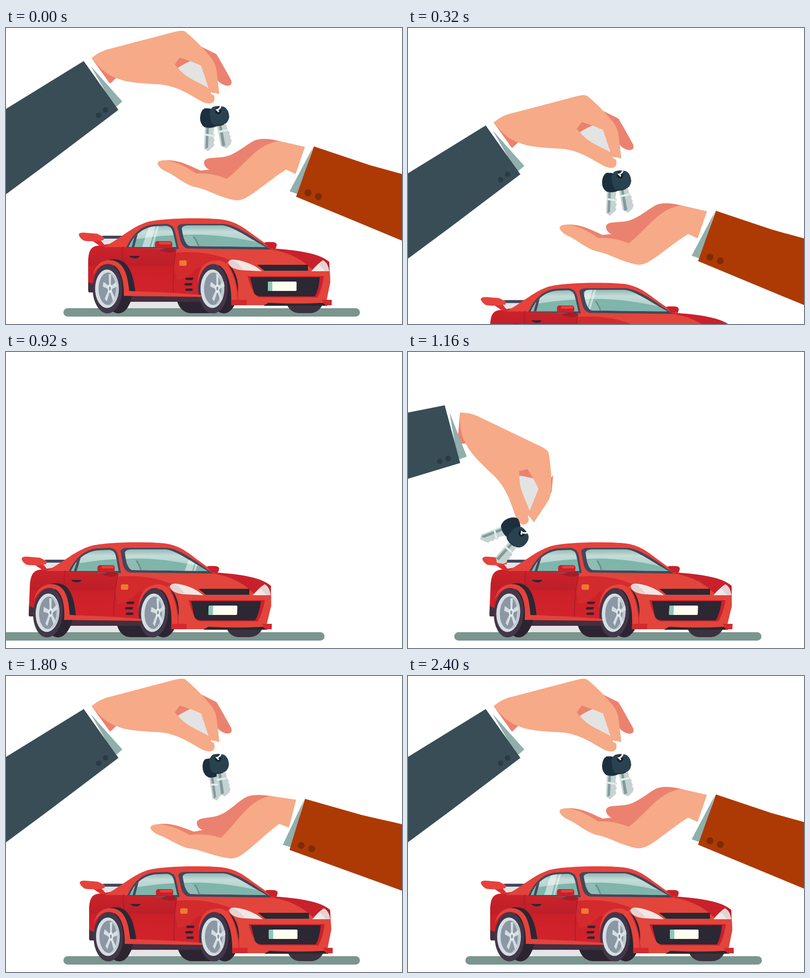
An HTML page that plays this animation: 800x600 px, repeating every 2440 ms.

```html
<!DOCTYPE html>
<html lang="en">
<head>
<meta charset="utf-8">
<title>Car keys handover</title>
<style>
html, body { margin: 0; width: 100%; height: 100%; overflow: hidden; background: #fff; }
svg { display: block; width: 100vw; height: 100vh; }
</style>
</head>
<body>
<svg viewBox="0 0 800 600">
  <defs>
    <linearGradient id="pane" x1="0" y1="0" x2="0" y2="1">
      <stop offset="0" stop-color="#8fb5b1"/><stop offset=".3" stop-color="#c3dcd8"/><stop offset="1" stop-color="#a5cbc5"/>
    </linearGradient>
    <linearGradient id="door" x1="0" y1="0" x2="0" y2="1">
      <stop offset="0" stop-color="#cf232b"/><stop offset=".38" stop-color="#bd1f29"/><stop offset=".42" stop-color="#cc2029"/><stop offset="1" stop-color="#d4242c"/>
    </linearGradient>
    <clipPath id="glass">
      <path d="M248 444C257 422 274 405 300 402L324 401Q334 402 337 413L344 444Z"/>
      <path d="M355 406Q357 400 368 400H438C460 403 495 428 524 444L372 442Q360 440 355 406Z"/>
    </clipPath>
    <g id="wheel">
      <ellipse cx="22" rx="29" ry="50" fill="#2c2531"/>
      <ellipse rx="30" ry="50" fill="#43374a"/>
      <ellipse cx="-1" rx="24" ry="39" fill="#d5dfe2"/>
      <ellipse cx="1" rx="19" ry="33" fill="#8b97a4"/>
      <path d="M4 -33A18 33 0 0 1 4 33A30 40 0 0 0 4 -33" fill="#bcc9cf"/>
    </g>
  </defs>

  <rect id="road" y="568" height="17" rx="8.500" fill="#7b958f"/>

  <g id="car">
    <path d="M250 555H352L360 568H250Z" fill="#e6e4e6"/>
    <path d="M345 552H425V578H372Q352 576 345 552Z" fill="#2c2531"/>
    <path d="M566 558H641Q632 578 614 578H592Q574 577 566 558Z" fill="#3b3240"/>
    <path d="M235 538H470V555H235Z" fill="#43303f"/>
    <path d="M166 512H182V536H168Q166 536 166 530Z" fill="#43303f"/>
    <path d="M188 426H232L212 441H196Z" fill="#e3e3e6"/>
    <path d="M194 421H238L232 427H196Z" fill="#45465a"/>
    <path d="M166 515V472C167 450 172 442 188 441L232 434L540 447C585 450 632 456 653 474L655 515L646 556L455 556V545L240 543Z" fill="url(#door)"/>
    <path d="M198 444C232 426 250 406 283 394C312 385 400 384 435 388C463 392 478 403 498 418L540 448L350 450L236 444Z" fill="#e6423c"/>
    <path d="M172 430L190 429L201 442L190 442Z" fill="#d92f31"/>
    <path d="M147 419Q148 414 160 415L184 417L198 424L197 430Q172 434 157 431Q148 425 147 419Z" fill="#e6423c"/>
    <path d="M343 449L528 448C574 451 606 470 619 487L654 491L655 515L648 551H658V562H455L456 530L390 480C372 465 354 458 343 458Z" fill="#e2453b"/>
    <path d="M344 455C385 452 420 457 452 470L440 481L385 487Q365 512 345 510L338 480Z" fill="#d32a2e"/>
    <path d="M523 448C575 448 630 456 646 470Q630 474 619 490C600 470 568 451 523 448Z" fill="#c9212b"/>
    <path d="M236 443Q231 465 243 486M343 450Q336 495 338 537" fill="none" stroke="#a51c28" stroke-width="1.500"/>

    <path d="M243 445C254 420 272 400 300 398L325 397Q338 399 341 411L349 448Z" fill="#45465a"/>
    <path d="M346 403Q349 397 360 397H440C466 399 502 426 535 449L367 447Q354 444 351 425Z" fill="#45465a"/>
    <g clip-path="url(#glass)">
      <rect x="240" y="399" width="290" height="47" fill="url(#pane)"/>
      <path d="M240 432C285 424 335 418 345 421C400 414 470 424 530 440V448H240Z" fill="#7fb5ab"/>
      <path d="M266 408L256 446" stroke="#45465a" stroke-width="5"/>
      <path d="M355 425Q372 416 381 425Q387 434 389 443H355Z" fill="#8fbdb5"/>
      <path d="M379 423Q386 432 389 443" stroke="#66918d" stroke-width="3" fill="none"/>
      <path id="shine" d="M290 398H303L289 447H274ZM306 398H310L296 447H292Z" fill="#fff" opacity=".5"/>
    </g>
    <path d="M310 450Q323 446 333 445L345 450L338 455Q320 457 310 450Z" fill="#a51c28"/>
    <rect x="301" y="432" width="35" height="14" rx="5" fill="#c9212b"/>
    <rect x="309" y="433.500" width="25" height="5" rx="2.500" fill="#e6423c"/>
    <path d="M522 435Q525 433 540 434Q547 435 547 440L545 447H532Z" fill="#c9212b"/>
    <path d="M249 462H270Q268 467 260 467Q251 466 249 462Z" fill="#2b2733"/>
    <rect x="350" y="471" width="15" height="11" rx="3" fill="#ee7a2f"/>
    <path d="M365 506H379L377 511H365Q359 508 365 506ZM363 517H377L375 522H363Q357 520 363 517ZM365 528H377V533H365Q358 531 365 528Z" fill="#2b2733"/>

    <use href="#wheel" x="205" y="528.500"/>
    <use href="#wheel" x="418" y="528.500"/>
    <g class="hub" transform="translate(210 528) scale(.5 1)"></g>
    <g class="hub" transform="translate(427 528) scale(.5 1)"></g>

    <path d="M208 470C248 461 257 500 262 538L245 534C245 502 232 480 208 470Z" fill="#2b2733"/>
    <path d="M176 502C180 468 216 463 232 480C245 494 247 518 249 533L340 537L394 541V545L238 543C239 512 231 479 207 478C190 478 181 490 176 502Z" fill="#e6423c"/>
    <path d="M387 520C388 480 407 471 428 471C454 474 466 505 470 552H486V562H455C457 518 445 479 420 478C400 478 391 500 387 520Z" fill="#e6423c"/>
    <path d="M448 480Q466 504 469 552" fill="none" stroke="#cf2a2e" stroke-width="2"/>
    <path d="M456 551H486V562H455Z" fill="#d32a2e"/>

    <path d="M449 475Q452 468 465 470C485 473 505 482 517 493L478 491Q453 489 449 475Z" fill="#f3e7e5"/>
    <path d="M452 471Q464 469 480 490Q453 489 449 475Z" fill="#e4d3d1"/>
    <path d="M617 493Q629 478 640 471Q650 475 653 493Z" fill="#f3e7e5"/>
    <path d="M632 479L640 471Q650 475 653 493H645Z" fill="#e4d3d1"/>
    <path d="M507 480H610V492H522Z" fill="#2b2733"/>
    <path d="M488 503H642Q638 532 629 546H512Q500 545 488 503Z" fill="#c9212b"/>
    <path d="M493 505H634Q632 530 624 544H514Q504 543 501 537Z" fill="#2b2733"/>
    <rect x="529" y="514" width="58" height="19" rx="2" fill="#fdfdf0"/>
    <path d="M531 514H538V533H531Q529 533 529 531V516Q529 514 531 514Z" fill="#8fc7b9"/>
    <path d="M520 563L530 557Q590 560 640 557L650 563Z" fill="#2b2733"/>
    <path d="M638 551H658V562H645Z" fill="#d32a2e"/>
  </g>

  <g id="taker">
    <g id="palm">
      <path d="M400 273C401 262 415 264 435 262C460 260 480 240 500 229Q518 220 556 230L500 270L446 306L384 295L412 288Q400 282 400 273Z" fill="#eb826f"/>
      <path d="M322 268C348 267 365 276 393 289L412 287L400 300L375 295Z" fill="#eb826f"/>
      <path d="M306 274Q308 267 324 268C348 273 362 280 384 295C410 294 430 299 446 306C470 287 490 262 510 247C525 236 538 231 552 229L604 241L585 296L566 287C540 303 515 325 490 341Q475 351 462 349C430 343 405 326 380 322C365 318 345 303 330 294Q308 285 306 274Z" fill="#f6aa87"/>
    </g>
    <path d="M620 242L573 331L590 337Z" fill="#90afad"/>
    <path d="M622 240L735 278L800 296L1500 496V722L800 431L586 342Z" fill="#ad3a04"/>
    <circle cx="610" cy="334" r="7" fill="#7f2a08"/><circle cx="631" cy="341.500" r="7" fill="#7f2a08"/>
  </g>

  <g id="giver">
    <g class="grip">
      <path id="finger" d="M395 38L425 53Q432 64 455 106Q458 117 447 117Q437 116 428 107L415 80Z" fill="#eb826f"/>
      <path d="M173 61L210 113L224 100Z" fill="#eb826f"/>
      <path d="M173 61C180 55 190 48 203 44L340 8Q358 3 363 8C380 22 395 37 410 55C420 67 423 74 425 84L431 134L418 131L421 139Q423 152 412 153Q402 154 385 143C360 128 335 115 305 114C270 112 240 110 222 101C205 96 190 82 173 61Z" fill="#f6aa87"/>
      <path d="M347 80L372 67L394 76Q397 85 402 100Q407 115 409 122C395 112 362 102 347 80Z" fill="#e3e3e4"/>
      <path d="M341 74L351 60L372 67Q355 75 347 81Z" fill="#eb826f"/>
      <path d="M414 131Q420 137 431 137" fill="none" stroke="#fff" stroke-width="2.500"/>
    </g>
    <path d="M171 77L235 149L220 162Z" fill="#90afad"/>
    <path d="M157 67L0 164L-700 597V864L0 337L90 270L227 166Z" fill="#394d56"/>
    <circle cx="187" cy="177" r="5.500" fill="#2a3a46"/><circle cx="201" cy="166" r="5.500" fill="#2a3a46"/>
    <g class="grip">
      <g id="back">
        <path d="M402 198L421 200L419 214L422 218L419 223L422 227L419 232L421 238L408 250L400 244Z" fill="#c6d2d2"/>
        <path d="M405 200H410L408 242L403 245Z" fill="#829a9b"/>
        <path d="M402 214L420 217V221L402 218Z" fill="#dff0ec"/>
        <path d="M401 163Q415 162 422 168L427 198Q415 205 401 201Q392 195 392 182Q393 167 401 163Z" fill="#1c2f3e"/>
      </g>
      <g id="front">
        <path d="M426 197L444 193L448 208L452 211L451 216L454 219L453 224L456 228L454 235L445 244L434 239Z" fill="#c6d2d2"/>
        <path d="M430 196L435 195L443 238L437 240Z" fill="#829a9b"/>
        <path d="M427 209L446 205L447 209L428 213Z" fill="#dff0ec"/>
        <path d="M418 160Q430 156 441 160Q450 165 451 180Q449 193 440 195Q430 200 418 197Q410 191 411 177Q411 165 418 160Z" fill="#2a4150"/>
        <path d="M411 177Q411 191 418 197Q428 200 440 195" fill="none" stroke="#1c2f3e" stroke-width="2"/>
        <circle cx="428.500" cy="168" r="6.500" fill="#16222d"/>
        <path d="M434 158Q432 165 426 166L430 170" fill="none" stroke="#fff" stroke-width="3"/>
      </g>
    </g>
  </g>
</svg>
<script>
const LOOP = 2440, STEP = 40, FALL = 560;
const $ = id => document.getElementById(id);
const all = s => document.querySelectorAll(s);
const clamp = u => Math.max(0, Math.min(1, u));
const inOut = u => u < .5 ? 4 * u ** 3 : 1 - 4 * (1 - u) ** 3;
const left = (t, start, span) => 1 - clamp((t - start) / span);
const set = (el, v) => el.setAttribute('transform', v);

all('.hub').forEach(h => {
  let s = '';
  for (let i = 0; i < 5; i++) s += `<path d="M-3 0L-5 -29H5L3 0Z" fill="#d5dfe2" transform="rotate(${i * 72})"/>`;
  h.innerHTML = `<g class="spin">${s}</g><circle r="9" fill="#e3ebed"/><circle r="4" fill="#8b97a4"/>`;
});

// Swing in past the rest pose by `over`, then settle: [x, y, arm angle, wrist angle, wrist slide]
function reach(t, start, from, over) {
  if (t < FALL) return over.map(() => 0);
  const rem = left(t, start, 600);
  const back = 1 - inOut(clamp((t - start - 600) / 360));
  return over.map((o, i) => o * back + from[i] * rem ** (i < 2 ? 3 : 1.5));
}

function track(t, keys) {
  if (t < FALL) return 0;
  let [t0, v0] = keys[0];
  for (const [t1, v1] of keys) {
    if (t < t1) {
      const u = clamp((t - t0) / (t1 - t0));
      return v0 + (v1 - v0) * (1 - Math.cos(Math.PI * u)) / 2;
    }
    [t0, v0] = [t1, v1];
  }
  return v0;
}

function draw(t) {
  const first = t < FALL;
  const drop = first ? 700 * (t / FALL) ** 3 : 0;

  const x0 = 116 - (first ? 0 : 700 * left(t, FALL, 880) ** 3);
  const x1 = 715 - (first ? 0 : 700 * left(t, FALL, 676) ** 3);
  $('road').setAttribute('x', x0);
  $('road').setAttribute('width', x1 - x0);
  set($('road'), `translate(0 ${drop})`);

  const dx = first ? 0 : 21 * (1 - inOut(clamp((t - 1440) / 500))) - 681 * left(t, FALL, 880) ** 3;
  const lean = first ? 0 : .042 * left(t, 1160, 280);
  set($('car'), `matrix(1 0 ${-lean} 1 ${dx + 515 * lean} ${drop})`);
  all('.spin').forEach(s => set(s, `rotate(${dx * 1.25})`));

  const sweep = t < 1000 ? .22 * t : .22 * Math.min(0, t - 2400);
  set($('shine'), `translate(${sweep} 0)`);

  const g = reach(t, 880, [-625, 309, 62.5, 63, 7], [12, -6, -4, -4.5, 7]);
  const r = reach(t, 1200, [625, -276, 33.4, 15.5], [-18, 9, -2.6, -2]);
  $('giver').style.display = first || t >= 880 ? '' : 'none';
  $('taker').style.display = first || t >= 1200 ? '' : 'none';
  set($('giver'), `translate(${g[0]} ${g[1] + drop}) rotate(${g[2]} 157 67)`);
  all('.grip').forEach(h => set(h, `translate(${g[4]} ${-.3 * g[4]}) rotate(${g[3]} 143 91)`));
  set($('finger'), `rotate(${g[3] * 1.4} 400 45)`);
  set($('taker'), `translate(${r[0]} ${r[1] + drop}) rotate(${r[2]} 622 240)`);
  set($('palm'), `rotate(${r[3]} 603 240)`);

  const hang = (id, keys) => set($(id), `rotate(${track(t, keys) - g[2] - g[3]} 432 158)`);
  hang('front', [[880, 60], [1160, 52], [1480, -52], [1800, 2], [2100, 0]]);
  hang('back', [[880, 75], [1160, 66], [1480, -42], [1800, -11], [2160, 0]]);
}

const begin = performance.now();
function tick() {
  const t = (performance.now() - begin) % LOOP;
  draw(Math.floor(t / STEP) * STEP);
  requestAnimationFrame(tick);
}
tick();
</script>
</body>
</html>
```
